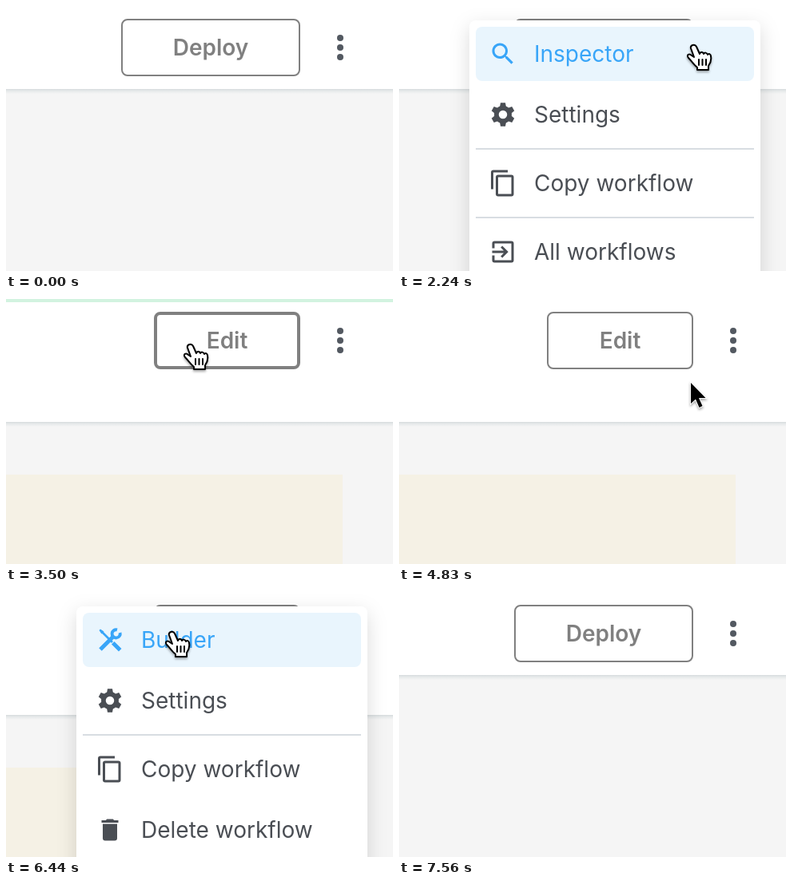
An HTML page that plays this animation: 484x332 px, repeating every 7840 ms.

```html
<!DOCTYPE html>
<html lang="en">
<head>
<meta charset="utf-8">
<title>Workflow menu</title>
<style>
  html, body { margin: 0; width: 100%; height: 100%; overflow: hidden; background: #fff; }
  svg { display: block; width: 484px; height: 332px; }
  text { font: 28px Inter, "Liberation Sans", sans-serif; }
  .label { font-weight: 600; fill: #808080; text-anchor: middle; }
  .button { fill: #fff; stroke: #808080; }
  .panel { fill: #fff; filter: drop-shadow(0 8px 12px rgba(0, 0, 0, .14)); }
  .item { fill: #4a4e54; color: #4a4e54; }
  .active { fill: #38a5f8; color: #38a5f8; }
  .line { fill: none; stroke: currentColor; }
</style>
</head>
<body>
<svg viewBox="0 0 484 332">
  <defs>
    <linearGradient id="edge" x2="0" y2="1">
      <stop offset="0" stop-color="#d6dbdd"/>
      <stop offset=".4" stop-color="#e6e9ea"/>
      <stop offset="1" stop-color="#f5f5f5"/>
    </linearGradient>
    <path id="search" d="M15.5 14h-.79l-.28-.27C15.41 12.59 16 11.11 16 9.5 16 5.91 13.09 3 9.5 3S3 5.91 3 9.5 5.91 16 9.5 16c1.61 0 3.09-.59 4.23-1.57l.27.28v.79l5 4.99L20.49 19zM9.5 14a4.5 4.5 0 1 1 0-9 4.5 4.5 0 0 1 0 9z"/>
    <g id="gear">
      <circle class="line" cx="12" cy="12" r="5.4" stroke-width="3.8"/>
      <g id="teeth"></g>
    </g>
    <path id="copy" d="M16 1H4a2 2 0 0 0-2 2v14h2V3h12zM19 5H8a2 2 0 0 0-2 2v14a2 2 0 0 0 2 2h11a2 2 0 0 0 2-2V7a2 2 0 0 0-2-2zm0 16H8V7h11z"/>
    <path id="bin" d="M6 19a2 2 0 0 0 2 2h8a2 2 0 0 0 2-2V7H6zM19 4h-3.5l-1-1h-5l-1 1H5v2h14z"/>
    <path id="exit" d="M10.09 15.59L11.5 17l5-5-5-5-1.41 1.41L12.67 11H3v2h9.67zM19 3H5a2 2 0 0 0-2 2v4h2V5h14v14H5v-4H3v4a2 2 0 0 0 2 2h14a2 2 0 0 0 2-2V5a2 2 0 0 0-2-2z"/>
    <g id="tools" class="line">
      <path d="M4 20L15 9M14.5 14.5L20.5 20.5" stroke-width="3.3"/>
      <path d="M5 5L14 14" stroke-width="1.8"/>
      <path d="M3 4L4 3L7 5L5 7Z" fill="currentColor" stroke="none"/>
      <path d="M18 3.6A3.4 3.4 0 1 0 20.4 6" stroke-width="2.6"/>
    </g>
  </defs>

  <rect width="484" height="332" fill="#f5f5f5"/>
  <rect id="card" y="220" width="421" height="112" fill="#f5f1e5"/>
  <rect id="header" width="484" fill="#fff"/>
  <rect id="edge-line" width="484" height="6" fill="url(#edge)"/>
  <rect id="banner" width="484" height="4" fill="#d2f3e0"/>
  <rect id="button" class="button"/>
  <text id="label" class="label" y="62"></text>
  <rect id="dots-bg" x="384" y="18" width="68" height="68" rx="4" fill="#cde7fc"/>
  <g id="dots">
    <circle cx="418" cy="40" r="4"/><circle cx="418" cy="52" r="4"/><circle cx="418" cy="64" r="4"/>
  </g>
  <g id="inspect-menu"></g>
  <g id="build-menu"></g>
  <circle id="ring" stroke="#a9c9fa" stroke-width="6" fill="#a9c9fa" fill-opacity=".15"/>
  <g id="cursor" style="filter: drop-shadow(0 2px 1.5px rgba(0, 0, 0, .35))">
    <g id="hand" stroke="#000" stroke-width="2" stroke-linejoin="round" stroke-linecap="round">
      <path fill="#fff" d="M-4 4C-5 0 1-2 3 2L7 11C8 8 11 8 12 11C13 9 16 9 17 12C18 10 21 11 21 14C22 19 21 22 18 26V31H4V28C0 25-3 20-7 16C-10 12-6 10-3 13L0 15Z"/>
      <path fill="none" d="M6 18V25M10.500 18V25M15 18V25"/>
    </g>
    <path id="arrow" stroke="#fff" stroke-width="2" paint-order="stroke" d="M0 0V26L6 20.500L10.500 31L14.500 29L10 19H18.500Z"/>
  </g>
</svg>
<script>
const LOOP = 7840, STEP = 70;
const $ = id => document.getElementById(id);
const set = (id, attrs) => {
  for (const k in attrs) $(id).setAttribute(k, attrs[k]);
};
const show = (id, on) => { $(id).style.display = on ? '' : 'none'; };
const clamp = v => Math.max(0, Math.min(1, v));

const ease = {
  in: u => u * u,
  out: u => 1 - (1 - u) ** 2,
  both: u => u * u * (3 - 2 * u)
};

// time, x, y, easing towards this point
const path = [
  [0, 330, 400], [630, 330, 400], [1050, 425, 50, 'out'], [2030, 425, 50],
  [2240, 369, 49, 'in'], [2870, 231, 57, 'out'], [3850, 231, 57],
  [4200, 225, 400, 'in'], [4760, 340, 400], [4830, 365, 105],
  [5040, 425, 50, 'out'], [5600, 425, 50], [6440, 208, 50, 'both'],
  [7140, 208, 50], [7560, 200, 400, 'in'], [LOOP, 330, 400]
];
const clicks = [1190, 2940, 5180, 6790];
const editFrom = 3220, editTo = 7070;
const menus = [
  ['inspect-menu', 1400, 3220], ['build-menu', 5390, 7070]
];

const item = (icon, name, y, active) =>
  `<g class="item ${active ? 'active' : ''}">
    <use href="#${icon}" transform="translate(112 ${y - 18}) scale(1.5)"/>
    <text x="169" y="${y + 10}">${name}</text></g>`;
const divider = y => `<rect x="96" y="${y}" width="348" height="2" fill="#d8dde2"/>`;
const menu = (icon, name, rest) =>
  `<rect class="panel" x="88" y="18" width="364" height="340" rx="8"/>
   <rect x="96" y="26" width="348" height="68" rx="8" fill="#e9f5fd"/>` +
  item(icon, name, 60, true) + item('gear', 'Settings', 136) + divider(178) +
  item('copy', 'Copy workflow', 222) + rest;

$('teeth').innerHTML = [0, 60, 120, 180, 240, 300].map(a =>
  `<path d="M9.300 6L10 2.200H14L14.700 6Z" transform="rotate(${a} 12 12)"/>`).join('');
$('inspect-menu').innerHTML = menu('search', 'Inspector',
  divider(264) + item('exit', 'All workflows', 308));
$('build-menu').innerHTML = menu('tools', 'Builder', item('bin', 'Delete workflow', 298));

function cursorAt(t) {
  const i = path.findIndex(p => p[0] > t);
  const [t0, x0, y0] = path[i - 1], [t1, x1, y1, e = 'both'] = path[i];
  const u = ease[e]((t - t0) / (t1 - t0));
  return [x0 + (x1 - x0) * u, y0 + (y1 - y0) * u];
}

function draw(t) {
  const [x, y] = cursorAt(t);
  const edit = t >= editFrom && t < editTo;
  const left = edit ? 185 : 144, base = edit ? 154 : 104;
  const open = menus.some(m => t >= m[1] && t < m[2]);
  const inRow = y > 16 && y < 88;
  const onButton = !open && inRow && x > left && x < 368;
  const onDots = !open && inRow && x > 384 && x < 452;

  set('header', { height: base });
  set('edge-line', { y: base });
  show('card', edit);
  show('banner', t >= 3290 && t < 3570);

  const w = onButton ? 4 : 2;
  set('button', {
    x: left + w / 2, y: 16 + w / 2, width: 368 - left - w, height: 72 - w,
    rx: 8 - w / 2, 'stroke-width': w
  });
  set('label', { x: (left + 368) / 2 });
  $('label').textContent = edit ? 'Edit' : 'Deploy';
  show('dots-bg', onDots);
  set('dots', { fill: onDots ? '#38a5f8' : '#535961' });

  for (const [id, from, to] of menus) {
    const a = Math.min(clamp((t - from + STEP) / 210), clamp((to - t) / 140));
    set(id, { opacity: a });
    show(id, a > 0);
  }

  const click = clicks.find(c => t > c && t < c + 280);
  show('ring', click !== undefined);
  if (click !== undefined) {
    const u = (t - click) / 280;
    set('ring', { cx: x + 1, cy: y - 1, r: 28 + 20 * u, opacity: clamp((1 - u) * 2) });
  }

  const hand = open || onButton || onDots;
  set('cursor', { transform: `translate(${x} ${y})` });
  show('hand', hand);
  show('arrow', !hand);
}

const start = performance.now();
function tick() {
  const t = (performance.now() - start) % LOOP;
  draw(Math.floor(t / STEP) * STEP);
  requestAnimationFrame(tick);
}
tick();
</script>
</body>
</html>
```
